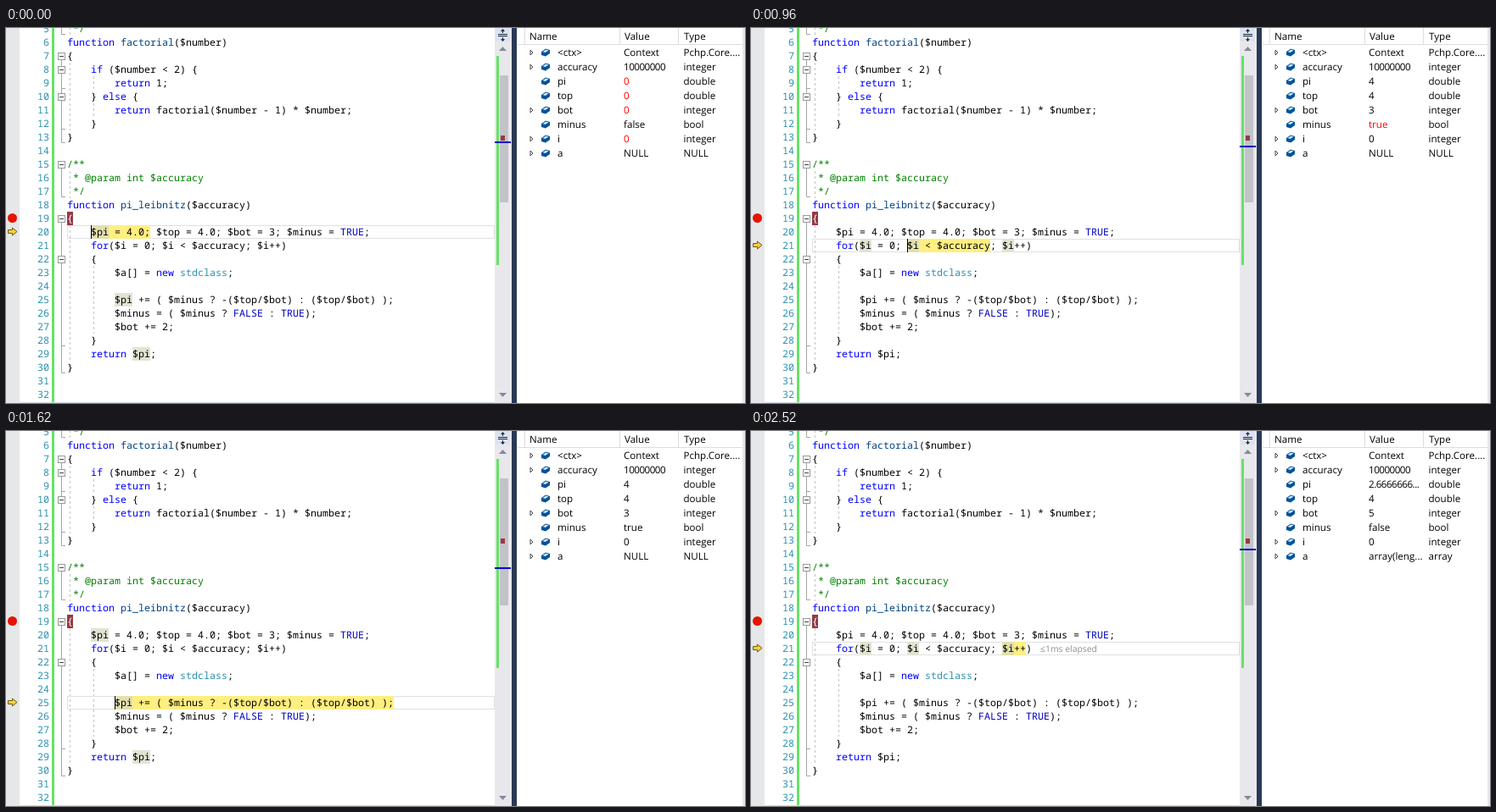
Write an HTML page that moves like this. It is 871 by 443 pixels and loops after 2580 ms.

```html
<!DOCTYPE html>
<html lang="en">
<head>
<meta charset="utf-8">
<title>Stepping through PHP code</title>
<style>
html, body { margin: 0; width: 100%; height: 100%; overflow: hidden; background: #fff; }
svg { display: block; width: 100%; height: 100%; }
text { white-space: pre; text-rendering: geometricPrecision; }
.code { font: 11.667px "Noto Sans Mono", "DejaVu Sans Mono", monospace; }
.ui { font: 11.6px "Open Sans", "Noto Sans", sans-serif; }
.num { letter-spacing: -.5px; }
.time { font: 10.4px "Open Sans", "Noto Sans", sans-serif; }
</style>
</head>
<body>
<svg viewBox="0 0 871 443">
  <g id="base"></g>
  <g id="marks"></g>
  <g id="code" class="code"></g>
  <g id="over"></g>
  <g id="vars" class="ui"></g>
</svg>
<script>
const LOOP = 2580, TICK = 60, LAG = 120;
const X0 = 72, CW = 7, FIRST = 5;
const lines = [
  ' */',
  'function factorial($number)',
  '{',
  '    if ($number < 2) {',
  '        return 1;',
  '    } else {',
  '        return factorial($number - 1) * $number;',
  '    }',
  '}',
  '',
  '/**',
  ' * @param int $accuracy',
  ' */',
  'function pi_leibnitz($accuracy)',
  '{',
  '    $pi = 4.0; $top = 4.0; $bot = 3; $minus = TRUE;',
  '    for($i = 0; $i < $accuracy; $i++)',
  '    {',
  '        $a[] = new stdclass;',
  '',
  '        $pi += ( $minus ? -($top/$bot) : ($top/$bot) );',
  '        $minus = ( $minus ? FALSE : TRUE);',
  '        $bot += 2;',
  '    }',
  '    return $pi;',
  '}',
  '',
  ''
];

// Debugger stops: when, line, statement, identifier under the caret,
// and what the variables pane changes (shown in red) shortly after.
const steps = [
  { at: 0, line: 20, run: '$pi = 4.0;', id: '$pi', set: { pi: '0', top: '0', bot: '0', i: '0' } },
  { at: 60, line: 20, run: '$top = 4.0;', id: '$top', set: { pi: '4' } },
  { at: 300, line: 20, run: '$bot = 3;', id: '$bot', set: { top: '4' } },
  { at: 480, line: 20, run: '$minus = TRUE;', id: '$minus', set: { bot: '3' } },
  { at: 720, line: 21, run: '$i = 0', id: '$i', set: { minus: 'true' } },
  { at: 960, line: 21, run: '$i < $accuracy', id: '$i', set: {} },
  { at: 1140, line: 22, run: '{', ms: 2, set: {}, result: ['-1', 'int'] },
  { at: 1380, line: 23, run: '$a[] = new stdclass;', id: '$a', set: {} },
  { at: 1560, line: 25, run: lines[20].trim(), id: '$pi', set: { a: 'array(leng...' },
    result: ['array(leng...', 'Pchp.Core....'] },
  { at: 1740, line: 26, run: lines[21].trim(), id: '$minus', set: { pi: '2.6666666...' } },
  { at: 1920, line: 27, run: '$bot += 2;', id: '$bot', set: { minus: 'false' } },
  { at: 2160, line: 28, run: '}', set: { bot: '5' } },
  { at: 2340, line: 21, run: '$i++', id: '$i', set: {} }
];

const el = id => document.getElementById(id);
const esc = s => s.replace(/&/g, '&amp;').replace(/</g, '&lt;');
const mid = n => 17 + 16 * (n - 6);
const colX = c => X0 + CW * c;
const rect = (x, y, w, h, fill, more = '') =>
  `<rect x="${x}" y="${y}" width="${w}" height="${h}" fill="${fill}" ${more}/>`;
const path = (d, fill, stroke = 'none', more = '') =>
  `<path d="${d}" fill="${fill}" stroke="${stroke}" ${more}/>`;
const text = (x, y, s, fill = '#000', more = '') =>
  `<text x="${x}" y="${y}" fill="${fill}" ${more}>${esc(s)}</text>`;

function colour(word, line) {
  if (/^\s*(\/\*|\*)/.test(line)) return '#008000';
  if (/^(function|if|else|return|for|new)$/.test(word)) return '#0000ff';
  if (/^(TRUE|FALSE)$/.test(word)) return '#0000c0';
  if (word === 'stdclass') return '#2b91af';
  if (line.startsWith('function ' + word)) return '#00407f';
  return '#000';
}

function drawCode() {
  let s = '';
  lines.forEach((line, k) => {
    const n = FIRST + k, y = mid(n) + 4;
    s += text(51, y, String(n), '#2b91af', 'text-anchor="end"');
    for (const m of line.matchAll(/\$?\w+|[^\s\w$]+/g)) {
      const fill = n === 19 ? '#fff' : colour(m[0], line);
      s += text(colX(m.index), y, m[0], fill);
    }
  });
  el('code').innerHTML = s;
}

function drawBase() {
  let s = rect(0, 0, 871, 443, '#fff') + rect(0, 0, 16, 443, '#e6e7e8') +
    rect(54, 0, 3, 443, '#66e266') + rect(16, 442, 560, 1, '#d4d8e6');

  // outlining
  const fold = [[5, 5], [7, 13], [8, 9], [10, 12], [15, 17], [19, 30], [22, 28]];
  for (const [a, b] of fold) {
    const top = a === 5 ? 0 : mid(a) + 4, end = mid(b) + 6.5;
    s += path(`M65.5 ${top}V${end}H70`, 'none', '#a5a5a5');
  }
  for (const [a] of fold.slice(1)) {
    const y = mid(a);
    s += rect(61.5, y - 3.5, 8, 8, '#fff', 'stroke="#999"') + rect(63, y, 5, 1, '#444');
  }

  // indent guides
  const guides = [[75.5, 5, 5], [75.5, 8, 12], [75.5, 16, 17], [75.5, 20, 29],
    [103.5, 9, 9], [103.5, 11, 11], [103.5, 23, 27]];
  for (const [x, a, b] of guides)
    s += path(`M${x} ${mid(a) - 8}V${mid(b) + 8}`, 'none', '#c4c4c4', 'stroke-dasharray="3 3"');

  s += rect(72, mid(19) - 8, 7, 16, '#963a46');
  s += `<circle cx="7.5" cy="${mid(19) - .5}" r="5.5" fill="#e51400"/>`;

  // scroll bar
  s += rect(576, 0, 20, 443, '#e8e8ec') + rect(578, 33, 3, 247, '#66e266') +
    rect(582, 56, 10, 150, '#c2c3c9') + rect(583, 127, 5, 6, '#963a46') +
    rect(577, 0, 17, 16, '#dce2f0') +
    path('M580 7.5H591M580 9.5H591M585.5 2V6M585.5 11V15', 'none', '#1b293e') +
    path('M583 4L585.5 1L588 4ZM583 13L585.5 16L588 13Z', '#1b293e') +
    path('M581 27L585.5 22L590 27Z', '#868999') +
    path('M581 431L585.5 436L590 431Z', '#868999');

  // splitter and pane header
  s += rect(596, 0, 6, 443, '#293955') + rect(868, 0, 3, 443, '#e6e7ed') +
    path('M611.5 0V19M723.5 0V19M792.5 0V19M603 19.5H868', 'none', '#dcdde2');
  s += '<g class="ui">' + text(617, 14, 'Name') + text(729, 14, 'Value') +
    text(799, 14, 'Type') + '</g>';
  el('base').innerHTML = s;
}

function drawStop(step, age) {
  const { line, run, id } = step;
  const src = lines[line - FIRST], y = mid(line);
  const from = src.indexOf(run), to = from + run.length;
  let under = rect(72.5, y - 7.5, 503, 15, 'none', 'stroke="#e0e0e4"') +
    rect(colX(from), y - 8, CW * run.length, 16, '#ffee80');

  if (id) {
    const word = new RegExp('\\' + id + '(?!\\w)', 'g');
    for (let n = 20; n < 30; n++)
      for (const m of lines[n - FIRST].matchAll(word)) {
        const hot = n === line && m.index >= from && m.index < to;
        under += rect(colX(m.index), mid(n) - 8, CW * id.length, 16,
          hot ? '#e2dfb0' : '#e2e4d3');
      }
  }
  el('marks').innerHTML = under;

  let over = path(`M2.5 ${y - 2.5}H7.5V${y - 5}L13 ${y - .5}L7.5 ${y + 4}V${y + 1.5}H2.5Z`,
    '#fbcf3c', '#6b5a1c');
  over += rect(576, Math.round(134 + 5.43 * (line - 20)), 19, 2, '#0000cd');
  if (age < 180) over += rect(colX(from), y - 8, 1, 16, '#000');
  if (step.at && age >= LAG)
    over += text(colX(src.length) + 10, y + 4, `≤${step.ms || 1}ms elapsed`,
      age < 180 ? '#c6c6c6' : '#8e8e8e', 'class="time"');
  el('over').innerHTML = over;
}

function drawVars(last) {
  const val = { minus: 'false', a: 'NULL' };
  steps.slice(0, last + 1).forEach(s => Object.assign(val, s.set));
  const { set, result } = steps[last];
  const rows = [
    ['<ctx>', 'Context', 'Pchp.Core....', 1],
    ['accuracy', '10000000', 'integer', 1],
    ['pi', val.pi, 'double'],
    ['top', val.top, 'double'],
    ['bot', val.bot, 'integer', 1],
    ['minus', val.minus, 'bool'],
    ['i', val.i, 'integer', 1],
    ['a', val.a, val.a === 'NULL' ? 'NULL' : 'array', 1]
  ];
  if (result) rows.unshift(['Pchp.Core....', ...result]);
  el('vars').innerHTML = rows.map(([name, value, type, open], k) => {
    const y = 29 + 17 * k, b = y + 4;
    return (open ? path(`M618 ${y - 3}L621 ${y}L618 ${y + 3}Z`, '#fff', '#444') : '') +
      path(`M631 ${y - 1}L636 ${y - 4.5}L641 ${y - 3}V${y + 1}L636 ${y + 4.5}L631 ${y + 3}Z`, '#00539c') +
      path(`M632.5 ${y - 1}L636.5 ${y - 3.5}L639.5 ${y - 2.5}L635.5 ${y}Z`, '#d5e6f5') +
      text(650, b, name) +
      text(728, b, value, name in set ? '#f00' : '#000', /^[-\d]/.test(value) ? 'class="num"' : '') +
      text(798.5, b, type);
  }).join('');
}

let shown = -1;
function render(ms) {
  const tick = Math.floor(ms % LOOP / TICK);
  if (tick !== shown) {
    shown = tick;
    const t = tick * TICK;
    const now = steps.findLastIndex(s => s.at <= t);
    drawStop(steps[now], t - steps[now].at);
    drawVars(Math.max(0, steps.findLastIndex(s => s.at + LAG <= t)));
  }
}

drawBase();
drawCode();
const start = performance.now();
render(0);
requestAnimationFrame(function loop() {
  render(performance.now() - start);
  requestAnimationFrame(loop);
});
</script>
</body>
</html>
```
